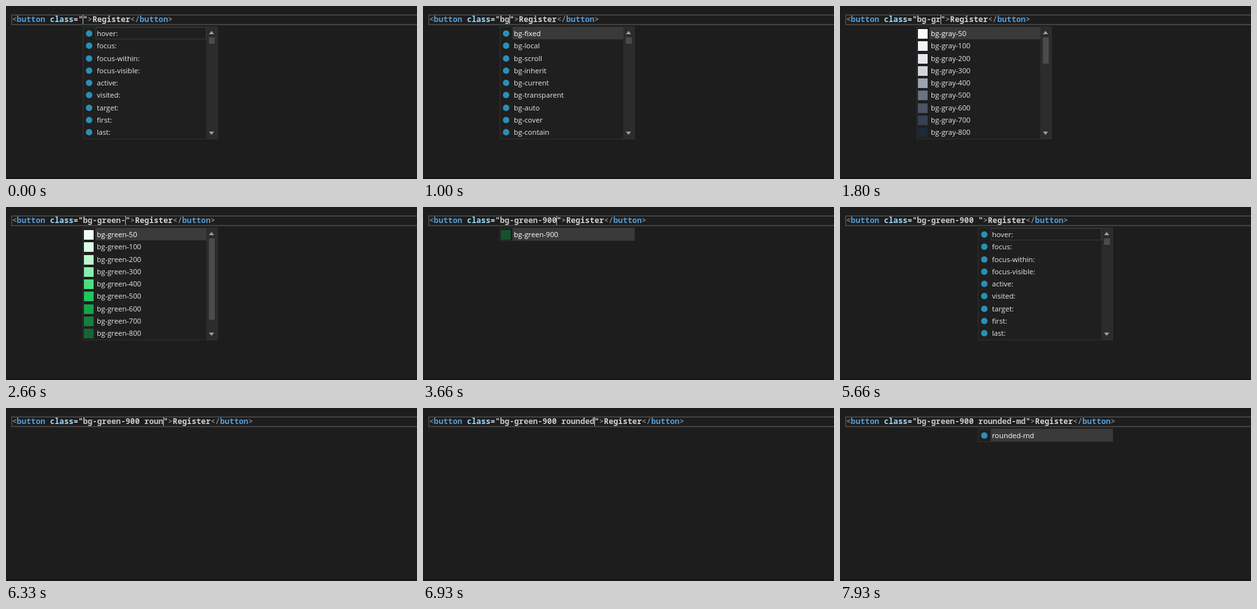
An HTML page that plays this animation: 638x270 px, repeating every 8 s.

```html
<!DOCTYPE html>
<html lang="en">
<head>
<meta charset="utf-8">
<title>Class name completion</title>
<style>
  html, body { margin: 0; width: 100%; height: 100%; overflow: hidden; background: #1d1d1d; }
  body { position: relative; }
  body::after { content: ""; position: absolute; left: 0; right: 0; bottom: 0; height: 3px; background: #1b1319; }
  #line, #caret, #menu, #tip { position: absolute; box-sizing: border-box; }
  #line {
    left: 8px; top: 13px; width: 640px; height: 17px; border: 2px solid #414141;
    font: 600 12.22px/13px "Noto Sans Mono", monospace; white-space: pre; color: #d4d4d4;
  }
  #line span { position: relative; left: -0.5px; top: -1px; }
  .mark { color: #808080; }
  .tag { color: #569cd6; }
  .attr { color: #9cdcfe; }
  .value { color: #c8c8c8; }
  #caret { top: 14px; width: 1px; height: 14px; background: #c0c0c0; }
  #menu, #tip { font: 11.15px/20px "Open Sans", sans-serif; color: #e8e8e8; white-space: pre; }
  #menu { top: 32px; width: 210px; background: #1f1f1f; border: 1px solid #303030; }
  .row { position: relative; height: 19.3px; }
  .label { position: absolute; box-sizing: border-box; left: 19px; right: 17px; height: 19px; padding-left: 2px; border: 0 solid #383838; }
  .single .label { right: 0; }
  .selected .label { background: #3a3a3b; color: #fff; }
  .outlined .label { border-width: 1px; padding-left: 1px; line-height: 18px; }
  .swatch { position: absolute; left: 1px; top: 3px; width: 15px; height: 15px; }
  .dot { position: absolute; left: 4px; top: 5px; width: 10px; height: 10px; border-radius: 50%; background: #2a8fb8; }
  .bar { position: absolute; right: 0; top: 0; bottom: 0; width: 17px; background: #2c2c2c; }
  .thumb { position: absolute; left: 4px; top: 16px; width: 9px; background: #4b4b4b; }
  .arrow { position: absolute; left: 4px; border: solid transparent; border-width: 0 4.5px; }
  .up { top: 6px; border-bottom: 5px solid #a0a0a0; }
  .down { bottom: 6px; border-top: 5px solid #a0a0a0; }
  #tip {
    left: 329px; top: 34px; width: 290px; height: 37px; padding: 4px 4px; border-radius: 3px;
    background: #424242; color: #f2f2f2; line-height: 15px;
  }
</style>
</head>
<body>
<div id="line"></div>
<div id="caret"></div>
<div id="menu"></div>
<div id="tip">--tw-bg-opacity: 1;
background-color: rgb(20 83 45 / var(--tw-bg-opacity));</div>
<script>
const LOOP = 8000, BLINK = 500, CHAR = 7.332, TEXT_X = 9.5, PREFIX = 15;
const $ = id => document.getElementById(id);

const words = (text, prefix = "") => text.split(" ").map(word => ({ label: prefix + word }));
const shades = (name, colors) => colors.split(" ").map((color, i) => ({
  label: `bg-${name}-${i ? i * 100 : 50}`, color: "#" + color
}));

const gray = shades("gray", "f9fafb f3f4f6 e5e7eb d1d5db 9ca3af 6b7280 4b5563 374151 1f2937 111827");
const green = shades("green", "f0fdf4 dcfce7 bbf7d0 86efac 4ade80 22c55e 16a34a 15803d 166534 14532d");

// Each menu: items, length of its scroll thumb, and whether the first row is only outlined.
const menu = (items, thumb, outlined = false) => ({ items, thumb, outlined });
const variants = menu(words("hover: focus: focus-within: focus-visible: active: visited: target: first: last:"), 10, true);
const startB = menu(words("before: backdrop: block border blur bg-fixed bg-local bg-scroll box-border"), 10);
const backgrounds = menu(words("fixed local scroll inherit current transparent auto cover contain", "bg-"), 10);
const grays = menu(gray, 41);
const greens = menu(green, 127);
const darkGreen = menu(green.slice(-1));
const corners = menu(words("none sm md lg xl 2xl 3xl full t", "rounded-"), 24);
const medium = menu(words("rounded-md"));

// [time, class value, open menu, tooltip shown]
const steps = [
  [0, "", variants],
  [700, "b", startB],
  [900, "bg", backgrounds],
  [1100, "bg-", backgrounds],
  [1450, "bg-g", grays],
  [1650, "bg-gr", grays],
  [2050, "bg-gre", greens],
  [2200, "bg-gree", greens],
  [2350, "bg-green", greens],
  [2550, "bg-green-", greens],
  [2950, "bg-green-9", darkGreen],
  [3120, "bg-green-90", darkGreen],
  [3280, "bg-green-900", darkGreen],
  [3850, "bg-green-900", darkGreen, true],
  [4250, "bg-green-900 ", null, true],
  [5000, "bg-green-900 ", variants],
  ...[5850, 5980, 6120, 6260, 6380, 6500, 6630].map((time, i) =>
    [time, "bg-green-900 " + "rounded".slice(0, i + 1), null]),
  [7000, "bg-green-900 rounded-", corners],
  [7170, "bg-green-900 rounded-m", medium],
  [7350, "bg-green-900 rounded-md", medium]
];

const span = (kind, text) => `<span class="${kind}">${text}</span>`;

function rowHTML({ label, color }, index, outlined) {
  const state = index ? "" : outlined ? "outlined" : "selected";
  const icon = color ? `<i class="swatch" style="background:${color}"></i>` : '<i class="dot"></i>';
  return `<div class="row ${state}">${icon}<div class="label">${label}</div></div>`;
}

function showStep([, value, list, tip]) {
  $("line").innerHTML =
    span("mark", "&lt;") + span("tag", "button") + span("attr", " class") + span("", "=") +
    span("value", `"${value}"`) + span("mark", "&gt;") + span("", "Register") +
    span("mark", "&lt;/") + span("tag", "button") + span("mark", "&gt;");
  $("caret").style.left = Math.round(TEXT_X + (PREFIX + value.length) * CHAR) + "px";
  $("tip").hidden = !tip;

  const box = $("menu");
  box.hidden = !list;
  if (!list) return;
  const single = list.items.length === 1;
  const wordStart = PREFIX + value.lastIndexOf(" ") + 1;
  box.className = single ? "single" : "";
  box.style.left = Math.floor(TEXT_X + wordStart * CHAR - 0.3) + "px";
  box.style.height = (single ? 21 : 176) + "px";
  box.innerHTML = list.items.slice(0, 9).map((item, i) => rowHTML(item, i, list.outlined)).join("") +
    (single ? "" : `<div class="bar"><i class="arrow up"></i>
      <i class="thumb" style="height:${list.thumb}px"></i><i class="arrow down"></i></div>`);
}

let shown;
function draw() {
  const time = performance.now() % LOOP;
  const step = steps.findLast(([start]) => start <= time);
  if (step !== shown) showStep(shown = step);
  $("caret").hidden = Math.floor((time - step[0]) / BLINK) % 2 === 1;
  requestAnimationFrame(draw);
}
draw();
</script>
</body>
</html>
```
